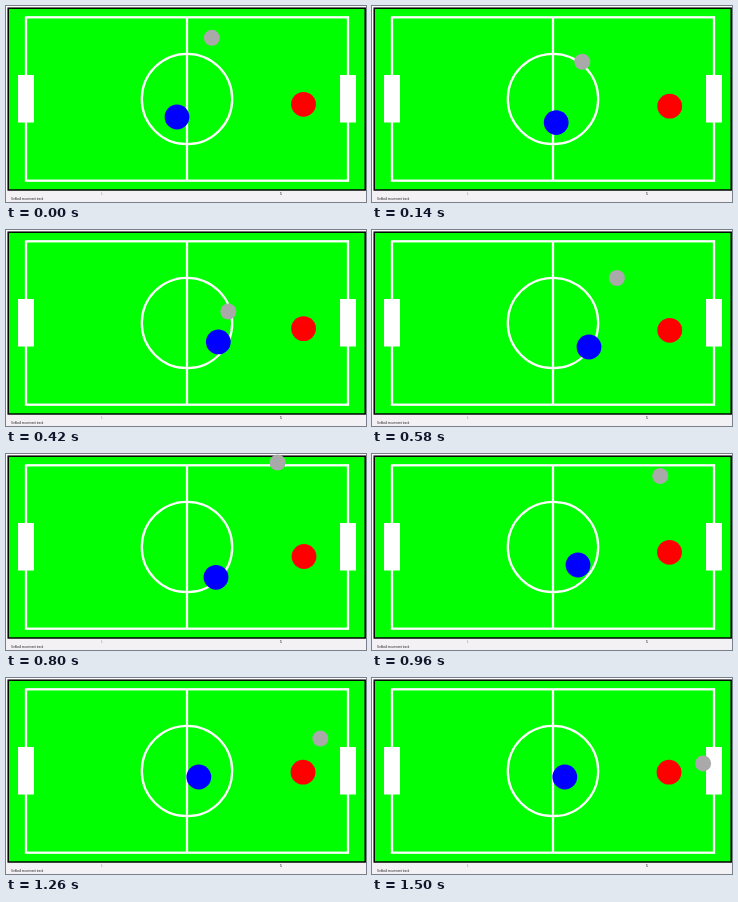
An HTML page for the animation above (1.52 s loop, 360 by 196 pixels).

```html
<!DOCTYPE html>
<html lang="en">
<head>
<meta charset="utf-8">
<title>Table football</title>
<style>
  html, body { margin: 0; width: 100%; height: 100%; overflow: hidden; background: #fff; }
  svg { display: block; width: 360px; height: 196px; }
  text { font-family: "Liberation Sans", Arial, sans-serif; fill: #222; }
</style>
</head>
<body>
<svg viewBox="0 0 360 196">
  <rect width="360" height="196" fill="#fff"/>
  <rect y="185" width="360" height="11" fill="#f4f1f4"/>
  <rect x="2.2" y="2.2" width="357" height="181.8" fill="#0f0" stroke="#000" stroke-width="1.5"/>
  <g fill="none" stroke="#fff" stroke-width="2.3">
    <rect x="20" y="11.3" width="322" height="163.4"/>
    <path d="M181 11V175"/>
    <circle cx="181" cy="93" r="45.2"/>
  </g>
  <g fill="#fff">
    <rect x="12" y="69" width="16" height="47.5"/>
    <rect x="334" y="69" width="16" height="47.5"/>
  </g>
  <circle id="blue" r="12.4" fill="#00f"/>
  <circle id="red" r="12.4" fill="#f00"/>
  <circle id="ball" r="8" fill="#a9a9a9"/>
  <text x="95" y="189" font-size="3" opacity=".5">1</text>
  <text x="273.8" y="189.2" font-size="4">5</text>
  <text x="5" y="194.3" font-size="3">Softball movement track</text>
</svg>
<script>
const LOOP = 1520, STEP = 20, DRAG = 0.0008, KICK = 375, WALL = 2.9;

// Turning points of the blue player: [time, x, y]
const turns = [[0, 171, 111], [260, 195.5, 121.3], [KICK, 211, 110.5], [580, 217, 117],
  [800, 210, 123.3], [960, 206, 111], [1260, 192.8, 99]];

function blueAt(t) {
  const i = turns.findIndex(p => p[0] > t);
  if (i < 0) return turns.at(-1).slice(1);
  const [t0, x0, y0] = turns[i - 1], [t1, x1, y1] = turns[i];
  const u = (t - t0) / (t1 - t0);
  return [x0 + (x1 - x0) * u, y0 + (y1 - y0) * u];
}

// Red mirrors the vertical moves of blue on a smaller scale
function redAt(t) {
  const dy = 0.34 * (blueAt(t)[1] - 111);
  return [297.5 + 0.12 * dy, 98.3 + dy];
}

// Distance factor of a rolling ball slowed by drag
const roll = t => (1 - Math.exp(-DRAG * t)) / DRAG;

// The ball rolls down, is kicked by blue, then bounces off the top wall
function ballAt(t) {
  if (t < KICK) {
    const d = roll(t);
    return [205.8 + 0.0335 * d, 31.8 + 0.181 * d];
  }
  const d = roll(t - KICK);
  const y = 91.7 - 0.231 * d;
  return [215.4 + 0.156 * d, WALL + Math.abs(y - WALL)];
}

const movers = Object.entries({ blue: blueAt, red: redAt, ball: ballAt })
  .map(([id, at]) => [document.getElementById(id), at]);

const start = performance.now();
function draw(now) {
  const t = Math.floor((Math.max(0, now - start) % LOOP) / STEP) * STEP;
  for (const [disc, at] of movers) {
    const [x, y] = at(t);
    disc.setAttribute("cx", x.toFixed(2));
    disc.setAttribute("cy", y.toFixed(2));
  }
  requestAnimationFrame(draw);
}
draw(start);
</script>
</body>
</html>
```
